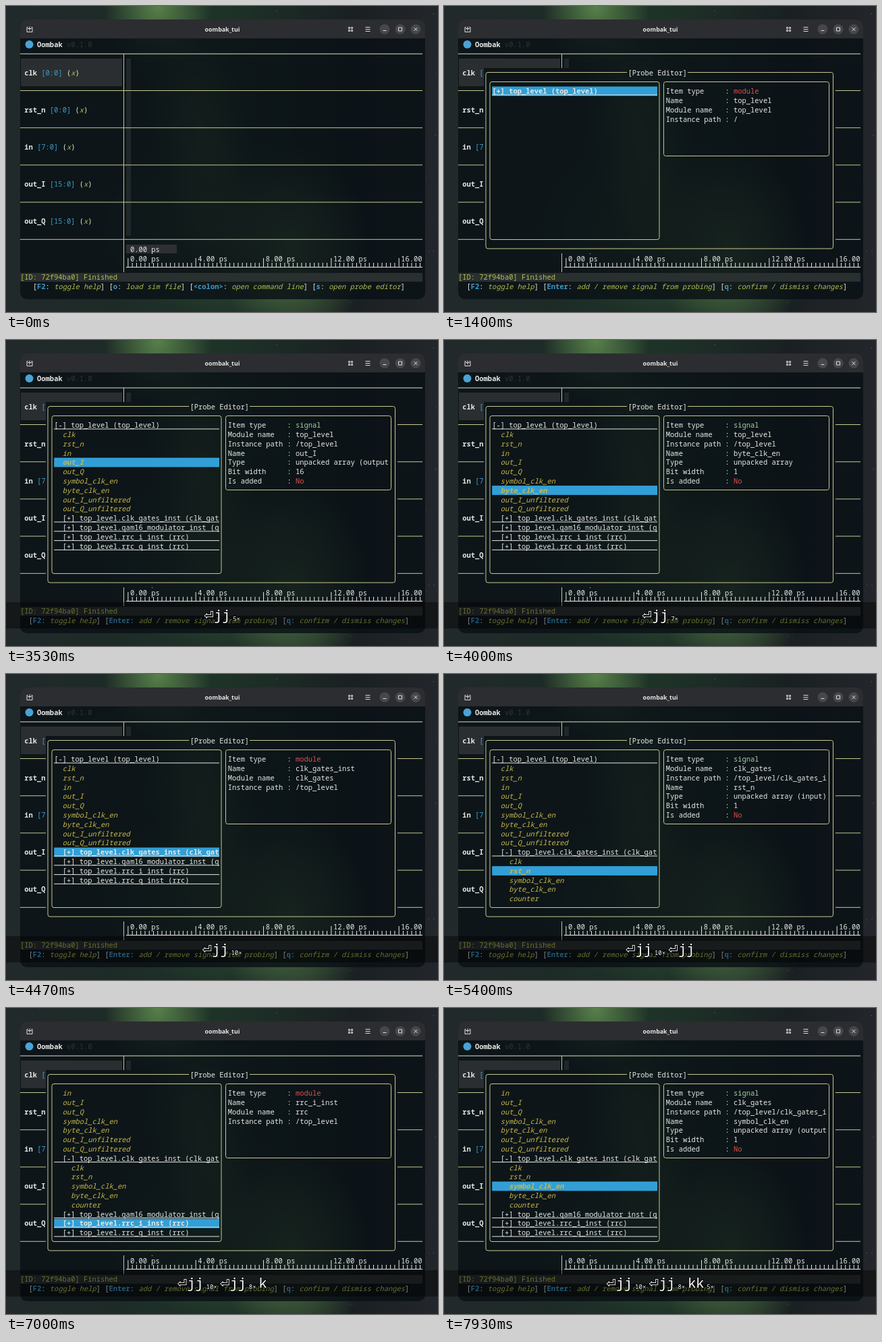
An HTML page that plays this animation: 640x454 px, repeating every 8 s.

```html
<!DOCTYPE html>
<html lang="en">
<head>
<meta charset="utf-8">
<title>oombak_tui</title>
<style>
html, body { margin: 0; width: 100%; height: 100%; overflow: hidden; background: #151b1d; }
svg { display: block; width: 640px; height: 454px; }
text { font: 10.45px "Noto Sans Mono", "DejaVu Sans Mono", monospace; fill: #e6e8e4; white-space: pre; }
.b { font-weight: bold; }
.i { font-style: italic; }
.blue { fill: #3d9bcb; }
.lime { fill: #b3be4e; }
.gold { fill: #c8b84c; }
.red { fill: #dc4f4c; }
.green { fill: #a9cfa4; }
.dim { fill: #2d3537; }
.line { stroke: #c6c88f; fill: none; }
.title { font: bold 8.8px "Open Sans", sans-serif; text-anchor: middle; }
.keys { font-size: 20px; fill: #fff; text-anchor: middle; stroke: #000; stroke-width: 1.5px; paint-order: stroke; }
.enter { font: 18px "DejaVu Sans", sans-serif; }
.sub { font-size: 9px; }
</style>
</head>
<body>
<svg viewBox="0 0 640 454">
  <defs>
    <linearGradient id="sky">
      <stop offset="0" stop-color="#22292b"/><stop offset=".25" stop-color="#1d2b27"/>
      <stop offset=".5" stop-color="#1e3328"/><stop offset=".8" stop-color="#1a2022"/>
      <stop offset="1" stop-color="#23262b"/>
    </linearGradient>
    <radialGradient id="glow">
      <stop offset="0" stop-color="#6b9d55"/><stop offset="1" stop-color="#6b9d55" stop-opacity="0"/>
    </radialGradient>
    <clipPath id="around">
      <path clip-rule="evenodd" d="M0 0H640V454H0ZM59 92H580V367H59Z"/>
    </clipPath>
  </defs>
  <rect width="640" height="454" fill="url(#sky)"/>
  <g fill="url(#glow)">
    <ellipse cx="225" cy="0" rx="80" ry="95" opacity=".75"/>
    <ellipse cx="290" cy="190" rx="75" ry="190" opacity=".5" transform="rotate(-8 290 190)"/>
    <ellipse cx="425" cy="360" rx="110" ry="150" opacity=".7"/>
    <ellipse cx="330" cy="330" rx="200" ry="130" opacity=".35"/>
  </g>
  <g id="stars" fill="#aab4b4"></g>
  <path d="M21 435V30a10 10 0 0 1 10-10H611a10 10 0 0 1 10 10V425a10 10 0 0 1-10 10H31a10 10 0 0 1-10-10Z" fill="#0a1116" fill-opacity=".84"/>
  <path d="M21 48V30a10 10 0 0 1 10-10H611a10 10 0 0 1 10 10V48Z" fill="#2c2d30"/>
  <text class="title" x="320.5" y="38">oombak_tui</text>
  <g fill="none" stroke="#dedede">
    <path d="M32.5 31.500H31V38.500H39V31.500H37.500M35 30.500V36.500M32 33.500H38"/>
    <path d="M507.500 31.500h2v2h-2zM511.500 31.500h2v2h-2zM507.500 35.500h2v2h-2zM511.500 35.500h2v2h-2z"/>
    <path d="M532.500 31.500h7M532.500 34.500h7M532.500 37.500h7"/>
    <g fill="#46474a" stroke="none">
      <circle cx="561" cy="34.500" r="7.500"/><circle cx="584" cy="34.500" r="7.500"/><circle cx="607" cy="34.500" r="7.500"/>
    </g>
    <path d="M558.500 36.500h5M581.500 32h5v5h-5zM604.500 32l5 5M609.500 32l-5 5"/>
  </g>
  <circle cx="34.500" cy="57" r="6" fill="#4aa3d6"/>
  <g id="main"></g>
  <g id="live"></g>
</svg>
<script>
const LOOP = 8000, CELL = 6.27, ROW = 13.8;
const $ = id => document.getElementById(id);
const col = n => 21 + n * CELL;
const mid = r => 57.5 + r * ROW;
const esc = s => s.replace(/&/g, '&amp;').replace(/</g, '&lt;');
const span = (s, c = '') => `<tspan class="${c}">${esc(s)}</tspan>`;
const put = (c, r, inner) => `<text x="${col(c)}" y="${mid(r) + 3.7}">${inner}</text>`;
const rect = (x, y, w, h, fill) => `<rect x="${x}" y="${y}" width="${w}" height="${h}" fill="${fill}"/>`;
const frame = (x, y, w, h) => `<rect class="line" x="${x}" y="${y}" width="${w}" height="${h}" rx="3"/>`;
const path = (d, stroke = '#c6c88f') => `<path class="line" d="${d}" style="stroke:${stroke}"/>`;

// Key times and the moments at which the interface reacts
const POPUP = 730, OPEN_TOP = 2200, OPEN_GATES = 4730;
const DOWN1 = [2730, 2930, 3130, 3400, 3530, 3730, 3930, 4070, 4270, 4470];
const MOVE1 = [2800, 3000, 3200, 3400, 3600, 3800, 3930, 4130, 4270, 4470];
const DOWN2 = [5200, 5400, 5600, 5800, 5930, 6070, 6270, 6470];
const MOVE2 = [5200, 5400, 5600, 5800, 5930, 6130, 6330, 6530];
const UP = [6930, 7130, 7330, 7530, 7730];
const count = (times, t) => times.filter(x => x <= t).length;

const signal = (name, type, width, owner = 'top_level', path = '/top_level', depth = 1) =>
  ({ name, type: 'unpacked array' + (type && ` (${type})`), width, owner, path, depth });
const gate = (name, type, width = 1) =>
  signal(name, type, width, 'clk_gates', '/top_level/clk_gates_inst', 2);
const module = (name, owner, depth = 1) => ({ name, owner, depth, path: depth ? '/top_level' : '/', module: true });

const top0 = module('top_level', 'top_level', 0);
const gates = module('clk_gates_inst', 'clk_gates');
const ports = [
  signal('clk', 'input', 1), signal('rst_n', 'input', 1), signal('in', 'input', 8),
  signal('out_I', 'output', 16), signal('out_Q', 'output', 16),
  signal('symbol_clk_en', '', 1), signal('byte_clk_en', '', 1),
  signal('out_I_unfiltered', '', 16), signal('out_Q_unfiltered', '', 16)
];
const gatePorts = [
  gate('clk', 'input'), gate('rst_n', 'input'), gate('symbol_clk_en', 'output'),
  gate('byte_clk_en', 'output'), gate('counter', '', 4)
];
const others = [module('qam16_modulator_inst', 'qam16_modulator'), module('rrc_i_inst', 'rrc'), module('rrc_q_inst', 'rrc')];

function stars() {
  let seed = 7, out = '';
  const rnd = () => (seed = seed * 16807 % 2147483647) / 2147483647;
  for (let i = 0; i < 90; i++) {
    const x = i % 2 ? 480 + rnd() * 160 : rnd() * 640;
    out += `<circle cx="${x}" cy="${rnd() * 454}" r="${.3 + rnd() * .4}" opacity="${.2 + rnd() * .5}"/>`;
  }
  return out;
}

function mainView() {
  let s = put(4, 0, span('Oombak ', 'b') + span('v0.1.0', 'dim'));
  s += rect(22, 78, 150, 41, '#2b2e30') + rect(178, 78, 7, 263, '#20272a') + rect(178, 354, 75, 13, '#2d3032');
  s += path('M21 71H617', '#dfe0c4') + path('M174.5 71V395');
  [['clk', '0:0'], ['rst_n', '0:0'], ['in', '7:0'], ['out_I', '15:0'], ['out_Q', '15:0']].forEach(([name, bits], i) => {
    s += put(1, 3 + 4 * i, span(name + ' ', 'b') + span(`[${bits}]`, 'blue') + span(' (') + span('x', 'i lime') + span(')'));
    s += path(`M21 ${125.5 + 55.2 * i}H617`);
  });
  s += put(26, 22, '0.00 ps');
  let ticks = 'M178 387.5H617';
  for (let i = 0; i < 70; i++) ticks += `M${col(25.5 + i)} 387.5V${i % 16 ? 381 : 374}`;
  s += path(ticks, '#e6e8e4');
  for (let i = 0; i < 5; i++) s += put(26 + 16 * i, 23, `${4 * i}.00 ps`.slice(0, i < 4 ? 8 : 5));
  return s + rect(21, 396, 596, 13, '#2a2f30') + put(0, 25, span('[ID: 72f94ba0] Finished', 'lime'));
}

function footer(items) {
  const width = items.reduce((n, [k, d]) => n + k.length + d.length + 5, -1);
  const inner = items.map(([k, d]) => span('[') + span(k, 'b blue') + span(': ') + span(d, 'i lime') + span(']')).join(' ');
  return put(Math.floor((95 - width) / 2), 26, inner);
}

function tree(rows, cursor, scroll, open) {
  return rows.slice(scroll, scroll + 16).map((item, i) => {
    const on = i + scroll === cursor, r = 5 + i, y = mid(r);
    const sign = open.includes(item) ? '-' : '+';
    const full = item.depth ? 'top_level.' + item.name : item.name;
    const label = item.module ? `[${sign}] ${full} (${item.owner})` : item.name;
    const text = ('  '.repeat(item.depth) + label).slice(0, 39);
    return (on ? rect(71.2, y - 7, 244.8, 13.8, '#319fd6') : '')
      + (item.module ? path(`M71.2 ${y + 5.5}H316`, '#e6e8e4') : '')
      + put(8, r, span(text, (item.module ? '' : 'i gold') + (on ? ' b' : '')));
  }).join('');
}

function details(item) {
  const lines = item.module
    ? [['Item type', 'module', 'red'], ['Name', item.name], ['Module name', item.owner], ['Instance path', item.path]]
    : [['Item type', 'signal', 'green'], ['Module name', item.owner], ['Instance path', item.path], ['Name', item.name],
       ['Type', item.type], ['Bit width', String(item.width)], ['Is added', 'No', 'red']];
  return lines.map(([k, v, c], i) =>
    put(49.1, 5 + i, span(k.padEnd(14) + ': ') + span(v.slice(0, 22), c))).join('');
}

function popup(t) {
  const open = [], rows = [top0];
  if (t >= OPEN_TOP) {
    open.push(top0);
    rows.push(...ports, gates);
    if (t >= OPEN_GATES) {
      open.push(gates);
      rows.push(...gatePorts);
    }
    rows.push(...others);
  }
  const lowest = count(MOVE1, t) + count(MOVE2, t);
  const cursor = lowest - count(UP, t);
  return path('M271 98.5H65a3 3 0 0 0-3 3V357a3 3 0 0 0 3 3H573.500a3 3 0 0 0 3-3V101.500a3 3 0 0 0-3-3H361')
    + put(40.1, 3, '[Probe Editor]')
    + frame(68, 112.500, 251, 234) + frame(325.500, 112.500, 245, 110)
    + tree(rows, cursor, Math.max(0, lowest - 15), open) + details(rows[cursor]);
}

function overlay(t) {
  if (t < 670 || t >= 1400 && t < 2130) return '';
  let inner = '', low = false;
  const add = (s, c) => {
    const sub = c === 'sub';
    inner += `<tspan class="${c}" dx="${sub || low ? 4 : 0}" dy="${sub ? 1.5 : low ? -1.5 : 0}">${s}</tspan>`;
    low = sub;
  };
  const press = (key, n) => {
    if (n) add(key.repeat(Math.min(n, 2)), '');
    if (n > 2) add(n + '×', 'sub');
  };
  if (t < 1400) add('s', '');
  else {
    add('⏎', 'enter');
    press('j', count(DOWN1, t));
    if (t >= 4670) add('⏎', 'enter');
    press('j', count(DOWN2, t));
    press('k', count(UP, t));
  }
  return rect(0, 389, 640, 39, 'rgba(0,0,0,.42)') + `<text class="keys" x="320" y="415">${inner}</text>`;
}

const HELP = ['F2', 'toggle help'];
const MAIN_KEYS = [HELP, ['o', 'load sim file'], ['<colon>', 'open command line'], ['s', 'open probe editor']];
const EDITOR_KEYS = [HELP, ['Enter', 'add / remove signal from probing'], ['q', 'confirm / dismiss changes']];

$('stars').innerHTML = stars();
$('main').innerHTML = mainView();
let shown;
function draw(now) {
  const t = now % LOOP, open = t >= POPUP;
  const view = footer(open ? EDITOR_KEYS : MAIN_KEYS) + (open ? popup(t) : '') + overlay(t);
  if (view !== shown) {
    $('live').innerHTML = shown = view;
    $('main').setAttribute('clip-path', open ? 'url(#around)' : 'none');
  }
  requestAnimationFrame(draw);
}
draw(performance.now());
</script>
</body>
</html>
```
